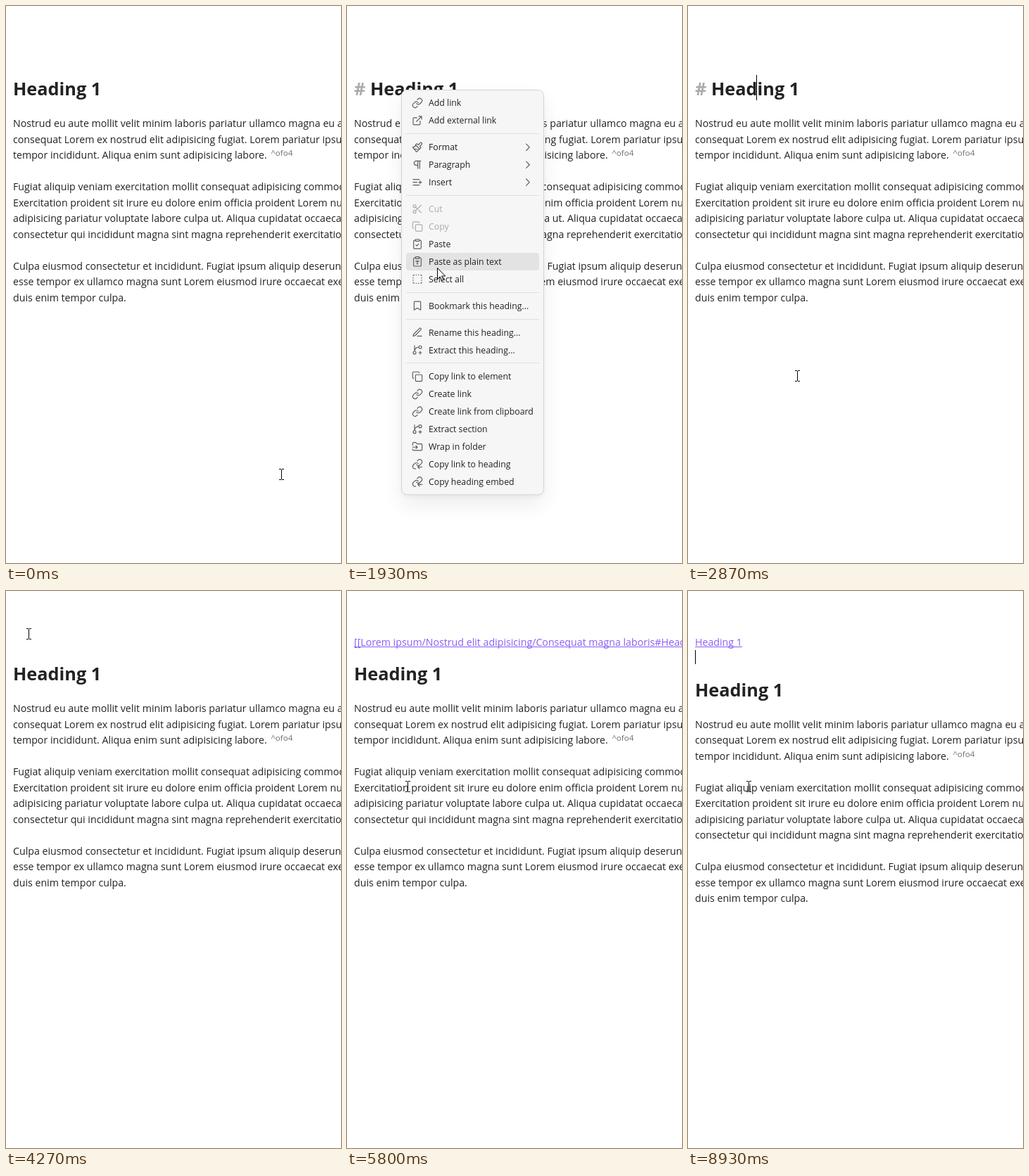
Recreate the animation shown at these times as an HTML page with a canvas. Size 476 by 792 pixels, loop 9470 ms.

```html
<!DOCTYPE html>
<html lang="en">
<head>
<meta charset="utf-8">
<title>Copy link to heading</title>
<style>
  html, body { margin: 0; width: 100%; height: 100%; overflow: hidden; background: #fff; }
  canvas { display: block; }
</style>
</head>
<body>
<canvas id="stage" width="476" height="792"></canvas>
<script>
const ctx = document.getElementById('stage').getContext('2d');
const LOOP = 9470, TICK = 200 / 3, BLINK = 530;
const LINE = 22.5, ROW = 24.92, GAP = 13, MENU_WIDTH = 203;
const INK = '#222', FAINT = '#ababab', LINK = '#8a5cf5';

const paragraphs = [
  'Nostrud eu aute mollit velit minim laboris pariatur ullamco magna eu aliqua',
  'consequat Lorem ex nostrud elit adipisicing fugiat. Lorem pariatur ipsum sit',
  'tempor incididunt. Aliqua enim sunt adipisicing labore.',
  '',
  'Fugiat aliquip veniam exercitation mollit consequat adipisicing commodo',
  'Exercitation proident sit irure eu dolore enim officia proident Lorem nulla',
  'adipisicing pariatur voluptate labore culpa ut. Aliqua cupidatat occaecat',
  'consectetur qui incididunt magna sint magna reprehenderit exercitation',
  '',
  'Culpa eiusmod consectetur et incididunt. Fugiat ipsum aliquip deserunt',
  'esse tempor ex ullamco magna sunt Lorem eiusmod irure occaecat exercitation',
  'duis enim tempor culpa.'
];
const rawLink = '[[Lorem ipsum/Nostrud elit adipisicing/Consequat magna laboris#Heading 1|Heading 1]]';

// Icons on a 24 unit grid
const board = 'M9 2h6a1 1 0 0 1 1 1v2a1 1 0 0 1-1 1H9a1 1 0 0 1-1-1V3a1 1 0 0 1 1-1z' +
  'M16 4h2a2 2 0 0 1 2 2v14a2 2 0 0 1-2 2H6a2 2 0 0 1-2-2V6a2 2 0 0 1 2-2h2';
const icons = {
  link: 'M10 13a5 5 0 0 0 7.54.54l3-3a5 5 0 0 0-7.07-7.07l-1.72 1.71M14 11a5 5 0 0 0-7.54-.54l-3 3a5 5 0 0 0 7.07 7.07l1.71-1.71',
  external: 'M18 13v6a2 2 0 0 1-2 2H5a2 2 0 0 1-2-2V8a2 2 0 0 1 2-2h6M15 3h6v6M10 14 21 3',
  brush: 'M18.37 2.63 14 7l-1.59-1.59a2 2 0 0 0-2.82 0L8 7l9 9 1.59-1.59a2 2 0 0 0 0-2.82L17 10l4.37-4.37a2.12 2.12 0 1 0-3-3zM9 8c-2 3-4 3.5-7 4l8 10c2-1 6-5 6-7M14.5 17.5 4.5 15',
  pilcrow: 'M13 4v16M17 4v16M19 4H9.5a4.5 4.5 0 0 0 0 9H13',
  insert: 'M11 12H3M16 6H3M16 18H3M18 9v6M21 12h-6',
  cut: 'M9 6a3 3 0 1 1-6 0 3 3 0 1 1 6 0zM9 18a3 3 0 1 1-6 0 3 3 0 1 1 6 0zM20 4 8.12 15.88M14.47 14.48 20 20M8.12 8.12 12 12',
  copy: 'M10 8h10a2 2 0 0 1 2 2v10a2 2 0 0 1-2 2H10a2 2 0 0 1-2-2V10a2 2 0 0 1 2-2zM4 16a2 2 0 0 1-2-2V4a2 2 0 0 1 2-2h10a2 2 0 0 1 2 2',
  paste: board + 'M9 14l2 2 4-4',
  plain: board + 'M9 12v-1h6v1M11 17h2M12 11v6',
  select: 'M5 3a2 2 0 0 0-2 2M19 3a2 2 0 0 1 2 2M21 19a2 2 0 0 1-2 2M5 21a2 2 0 0 1-2-2M9 3h1M14 3h1M9 21h1M14 21h1M3 9v1M21 9v1M3 14v1M21 14v1',
  bookmark: 'M19 21l-7-4-7 4V5a2 2 0 0 1 2-2h10a2 2 0 0 1 2 2z',
  rename: 'M12 20h9M16.5 3.5a2.12 2.12 0 0 1 3 3L7 19l-4 1 1-4z',
  extract: 'M6 3v12M18 9a3 3 0 1 0 0-6 3 3 0 0 0 0 6zM6 21a3 3 0 1 0 0-6 3 3 0 0 0 0 6zM15 6a9 9 0 0 0-9 9M18 15v6M21 18h-6',
  folder: 'M2 9V5a2 2 0 0 1 2-2h3.9a2 2 0 0 1 1.69.9l.81 1.2a2 2 0 0 0 1.67.9H20a2 2 0 0 1 2 2v10a2 2 0 0 1-2 2H4a2 2 0 0 1-2-2v-1M2 13h10M9 16l3-3-3-3',
  incoming: 'M10 13a5 5 0 0 0 7.54.54l3-3a5 5 0 0 0-7.07-7.07l-1.72 1.71M14 11a5 5 0 0 0-7.54-.54l-3 3a5 5 0 0 0 5 8.3M22 18h-9M16.5 14.5 13 18l3.5 3.5',
  chevron: 'M8.5 19l7-7-7-7'
};
for (const name in icons) icons[name] = new Path2D(icons[name]);

// Menu rows as [icon, label]; null is a separator
const editRows = [
  ['link', 'Add link'], ['external', 'Add external link'], null,
  ['brush', 'Format'], ['pilcrow', 'Paragraph'], ['insert', 'Insert'], null,
  ['cut', 'Cut'], ['copy', 'Copy'], ['paste', 'Paste'], ['plain', 'Paste as plain text'], ['select', 'Select all'], null
];
const sectionRows = [
  ['link', 'Create link'], ['link', 'Create link from clipboard'], ['extract', 'Extract section'], ['folder', 'Wrap in folder']
];
const headingMenu = {
  x: 77, y: 119, from: 930, to: 2860,
  rows: [
    ...editRows, ['bookmark', 'Bookmark this heading...'], null,
    ['rename', 'Rename this heading...'], ['extract', 'Extract this heading...'], null,
    ['copy', 'Copy link to element'], ...sectionRows,
    ['incoming', 'Copy link to heading'], ['incoming', 'Copy heading embed']
  ]
};
const lineMenu = { x: 32, y: 62, from: 4530, to: 5795, rows: [...editRows, ...sectionRows] };
const submenus = ['Format', 'Paragraph', 'Insert'], disabled = ['Cut', 'Copy'];

// Pointer path: time, x, y
const path = [
  [0, 391, 666], [333, 73, 179], [400, 73, 179], [733, 78, 122], [860, 78, 122],
  [1267, 88, 150], [1400, 88, 150], [1933, 128, 372], [2400, 153, 523], [2533, 155, 526],
  [2866, 155, 526], [3600, 32, 61], [4600, 32, 61], [5133, 69, 224], [5533, 86, 278], [LOOP, 86, 278]
];

function pointerAt(t) {
  const i = Math.max(1, path.findIndex(p => p[0] >= t));
  const [t0, x0, y0] = path[i - 1], [t1, x1, y1] = path[i];
  const k = (t - t0) / (t1 - t0);
  return [Math.round(x0 + (x1 - x0) * k), Math.round(y0 + (y1 - y0) * k)];
}

function text(string, x, y, size, color = INK, weight = 400) {
  ctx.font = `${weight} ${size}px "Open Sans", "Noto Sans", sans-serif`;
  ctx.fillStyle = color;
  ctx.fillText(string, x, Math.round(y));
  return ctx.measureText(string).width;
}

function box(x, y, w, h, color) {
  ctx.fillStyle = color;
  ctx.fillRect(x, y, w, h);
}

function icon(name, cx, cy, color) {
  ctx.save();
  ctx.translate(cx - 8, cy - 8);
  ctx.scale(2 / 3, 2 / 3);
  ctx.lineWidth = 1.75;
  ctx.lineCap = ctx.lineJoin = 'round';
  ctx.strokeStyle = color;
  ctx.stroke(icons[name]);
  ctx.restore();
}

function caret(x, y, h, t, start) {
  if (Math.max(0, t - start) % (2 * BLINK) < BLINK) box(x, y, 1, h, '#000');
}

function drawLink(string) {
  const w = text(string, 10, 78, 14.2, LINK);
  box(10, 79, w, 1, LINK);
}

function drawPage(t) {
  const shift = t >= 6795 ? LINE : 0;
  if (shift) drawLink('Heading 1');
  else if (t >= 5795) drawLink(rawLink);

  const editing = t >= 860 && t < 3995;
  if (editing) text('#', 10, 127, 25.3, FAINT, 700);
  text('Heading 1', editing ? 33 : 10, 127.2 + shift, 25.3, INK, 700);
  paragraphs.forEach((line, i) => text(line, 10, 172.2 + LINE * i + shift, 14.2));
  text('^ofo4', 376.5, 213 + shift, 11.6, '#707070');

  if (t >= 6795) caret(10, 84, 20, t, 6805);
  else if (t >= 5795) return;
  else if (t >= 3795) caret(10, 62, 20, t, 3735);
  else if (t >= 860) caret(97, 98, 36, t, t < 2860 ? 905 : 2865);
}

function drawMenu({ x, y, rows }, px, py) {
  const height = 13 + rows.reduce((sum, row) => sum + (row ? ROW : GAP), 0);
  ctx.beginPath();
  ctx.roundRect(x + .5, y + .5, MENU_WIDTH - 1, height - 1, 8);
  ctx.fillStyle = '#f6f6f6';
  for (const [offset, blur, alpha] of [[15, 30, .07], [3.4, 6.7, .042]]) {
    ctx.save();
    ctx.shadowColor = `rgba(0,0,0,${alpha})`;
    ctx.shadowOffsetY = offset;
    ctx.shadowBlur = blur;
    ctx.fill();
    ctx.restore();
  }
  ctx.lineWidth = 1;
  ctx.strokeStyle = '#d3d3d3';
  ctx.stroke();

  let top = y + 6.5;
  for (const row of rows) {
    if (!row) {
      box(x + 7, Math.round(top + 6), 189, 1, '#e0e0e0');
      top += GAP;
      continue;
    }
    const [name, label] = row, cy = top + ROW / 2, off = disabled.includes(label);
    if (!off && px >= x + 7 && py >= top && py < top + ROW) {
      ctx.beginPath();
      ctx.roundRect(x + 7, Math.round(top), 189, 25, 4);
      ctx.fillStyle = '#e3e3e3';
      ctx.fill();
    }
    icon(name, x + 23, cy, off ? FAINT : '#5c5c5c');
    text(label, x + 39, cy + 4.5, 12.3, off ? FAINT : INK);
    if (submenus.includes(label)) icon('chevron', x + 180, cy, '#5c5c5c');
    top += ROW;
  }
}

const arrow = new Path2D('M.5.5v16l3.7-3.6 2.5 5.6 2.4-1-2.5-5.5h5.1z');

function drawArrow(x, y) {
  ctx.save();
  ctx.translate(x, y);
  ctx.lineWidth = 1;
  ctx.fillStyle = '#fff';
  ctx.strokeStyle = '#000';
  ctx.fill(arrow);
  ctx.stroke(arrow);
  ctx.restore();
}

function drawBeam(x, y) {
  box(x, y - 7, 1, 14, '#000');
  for (const edge of [y - 8, y + 7]) {
    box(x - 3, edge, 3, 1, '#000');
    box(x + 1, edge, 3, 1, '#000');
  }
}

function draw(now) {
  const t = Math.floor((now % LOOP + 3.4) / TICK) * TICK;
  const [px, py] = pointerAt(t);
  box(0, 0, 476, 792, '#fff');
  drawPage(t);
  const menu = [headingMenu, lineMenu].find(m => t >= m.from && t < m.to);
  if (menu) drawMenu(menu, px, py);
  if (menu && px >= menu.x && py >= menu.y) drawArrow(px, py);
  else drawBeam(px, py);
  requestAnimationFrame(draw);
}
requestAnimationFrame(draw);
</script>
</body>
</html>
```
